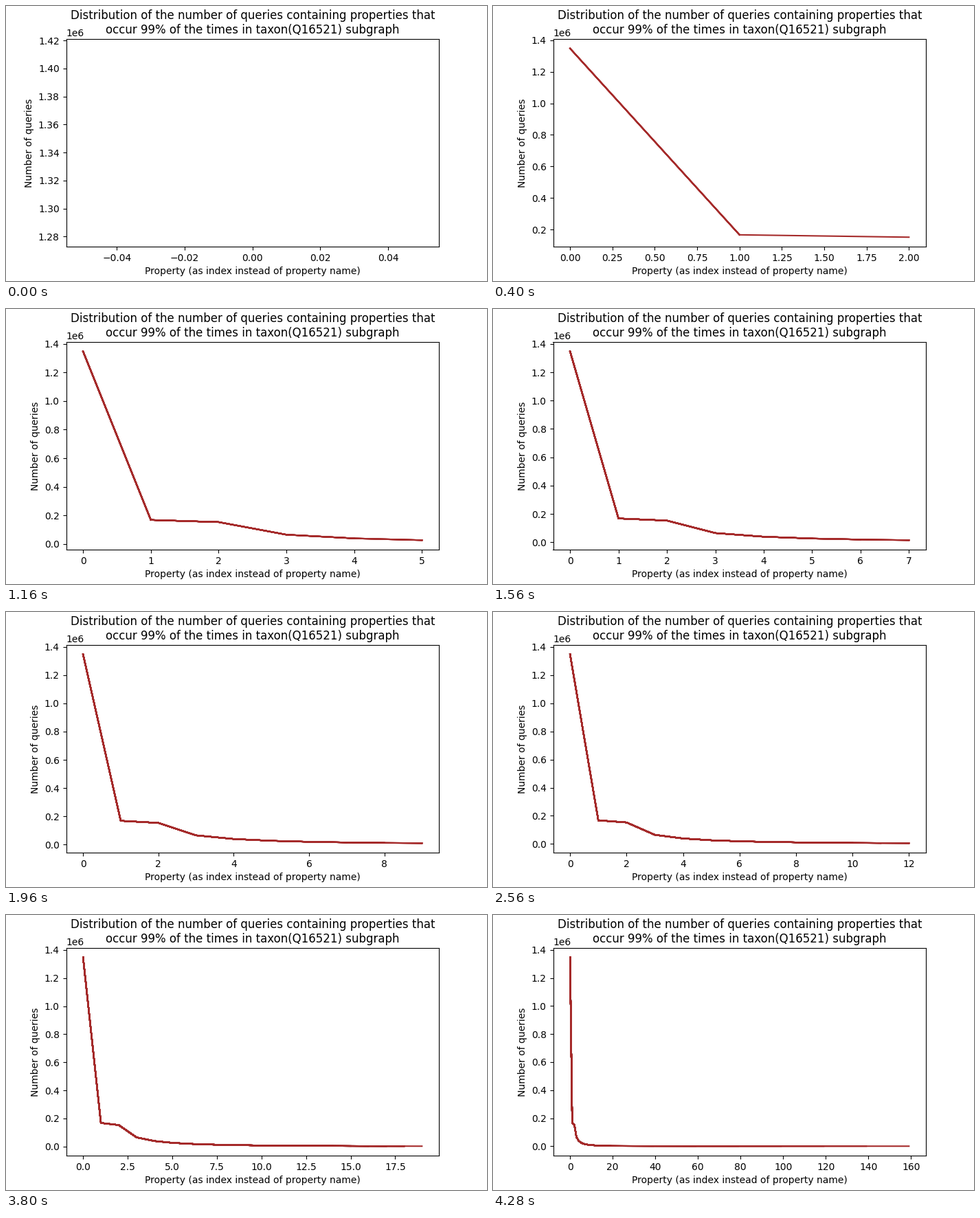
Recreate the animation shown at these times as a matplotlib script. Size 700 px wide and 400 px high, loop 4320 ms.

```python
import matplotlib.pyplot as plt
import numpy as np
from matplotlib.animation import FuncAnimation

FRAME_MS = 40
HOLD = 5     # frames spent on each of the first points
SINGLE = 20  # points added one at a time, then this many at once
TOTAL = 160

plt.rcParams["font.family"] = "DejaVu Sans"

# Queries per property: three common ones, then a power law
rank = np.arange(TOTAL)
queries = 65e3 * (3 / np.maximum(rank, 3)) ** 1.76
queries[:3] = 1346930, 168e3, 153e3

counts = [n for n in range(1, SINGLE + 1) for _ in range(HOLD)]
counts += range(SINGLE, TOTAL + 1, SINGLE)

fig, ax = plt.subplots(figsize=(7, 4), dpi=100)
fig.subplots_adjust(left=0.125, right=0.9, bottom=0.125, top=0.88)
# A fixed y keeps the title from moving above the axis multiplier
ax.set_title("Distribution of the number of queries containing properties that\n"
             "occur 99% of the times in taxon(Q16521) subgraph", y=1.0)
ax.set_xlabel("Property (as index instead of property name)")
ax.set_ylabel("Number of queries")

# Every step adds a line over the earlier ones, so edges darken
lines = [ax.plot(rank[:n], queries[:n], color="brown", lw=1.5)[0]
         for n in counts]


def update(step):
    for i, line in enumerate(lines):
        line.set_visible(i <= step)
    ax.relim(visible_only=True)
    ax.autoscale_view()
    return lines


anim = FuncAnimation(fig, update, frames=len(counts), interval=FRAME_MS,
                     repeat=True, repeat_delay=0, blit=False)
plt.show()
```
